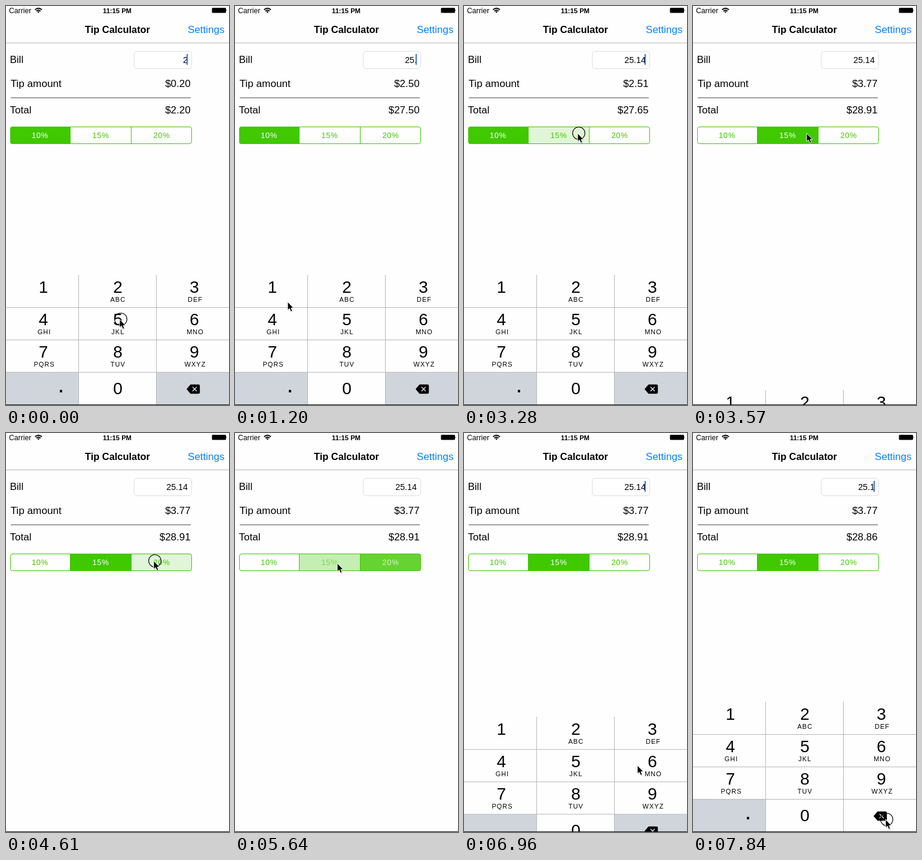
Animation of 373x665 px, one loop 7990 ms. Source, as an HTML page:

```html
<!DOCTYPE html>
<html lang="en">
<head>
<meta charset="utf-8">
<title>Tip Calculator</title>
<style>
  html, body { margin: 0; width: 100%; height: 100%; overflow: hidden; background: #fefefe; }
  svg { display: block; width: 373px; height: 665px; font: 17px "Liberation Sans", Arial, sans-serif; }
  .mid { text-anchor: middle; }
  .end { text-anchor: end; }
  .bold { font-weight: bold; }
  .digit { font-size: 28px; }
  .letters { font-size: 11px; letter-spacing: 1px; }
  .rate { font-size: 13px; letter-spacing: .7px; }
  .rule { fill: none; stroke: #b9b9bb; }
</style>
</head>
<body>
<svg viewBox="0 0 373 665">
  <rect width="373" height="665" fill="#fefefe"/>
  <path class="rule" d="M0 61.5H373"/>

  <text x="5" y="11.5" font-size="12.2">Carrier</text>
  <g fill="none" stroke="#000" stroke-width="1.8">
    <path d="M48.6 6.3Q54.3 1.3 60 6.3M50.8 8.6Q54.3 5.5 57.8 8.6"/>
    <path d="M52.4 9.6Q54.3 8 56.2 9.6L54.3 11.7Z" fill="#000" stroke="none"/>
  </g>
  <text class="mid bold" x="186" y="11.5" font-size="11.2">11:15 PM</text>
  <rect x="344.5" y="3" width="23.5" height="8.5" rx="1.5"/>
  <path d="M368.7 5.5q1.6 1.7 0 3.5z"/>

  <text class="mid bold" x="186.5" y="45" font-size="16.4">Tip Calculator</text>
  <text class="end" x="365.5" y="45" fill="#0080ff">Settings</text>

  <text x="6.5" y="95">Bill</text>
  <text x="7.5" y="135" font-size="17.2">Tip amount</text>
  <text x="6.5" y="179">Total</text>
  <rect x="214.5" y="75.5" width="96" height="29" rx="4.5" fill="#fff" stroke="#dedede"/>
  <text id="bill" class="end" x="304" y="95" font-size="14.3"></text>
  <rect id="caret" x="302" y="80" width="2" height="18" fill="#3b6fe6"/>
  <text id="tip" class="end" x="308.7" y="135"></text>
  <path d="M8 153H309" stroke="#808080" stroke-width="1.3"/>
  <text id="total" class="end" x="308.7" y="179"></text>

  <clipPath id="round"><rect x="7" y="201" width="304" height="29" rx="4"/></clipPath>
  <g id="segments" clip-path="url(#round)"></g>
  <path d="M107.5 201V230M209.5 201V230" stroke="#40c800"/>
  <rect x="7.5" y="201.5" width="303" height="28" rx="3.5" fill="none" stroke="#40c800"/>

  <g id="keyboard">
    <rect y="448" width="373" height="217" fill="#fefefe"/>
    <rect id="dotKey" y="611" width="121" height="54"/>
    <rect id="deleteKey" x="252" y="611" width="121" height="54"/>
    <path class="rule" d="M0 502.5H373M0 556.5H373M0 610.5H373M121.5 448V665M251.5 448V665"/>
    <g id="keys"></g>
    <text class="mid bold" x="92" y="644" font-size="27">.</text>
    <path d="M303 638.5L309 631.5H322Q323.5 631.5 323.5 633V644Q323.5 645.5 322 645.5H309Z"
          stroke="#000" stroke-width="1.5" stroke-linejoin="round"/>
    <path d="M312 635l7 7m0-7l-7 7" stroke="#e8ebef" stroke-width="1.4"/>
  </g>
  <rect y="664" width="373" height="1" fill="#1c1f22"/>

  <g id="pointer">
    <circle id="touch" cx="2" cy="0" r="10.3" fill="none" stroke="#000" stroke-width="1.1"/>
    <path d="M1 2V15.5L4.2 12.6L6.4 17.5L9.2 16.3L7 11.6H11Z" fill="#000" opacity=".2"/>
    <path d="M0 0V14L3.2 11.2L5.4 16.4L8 15.2L5.9 10.4H10Z" fill="#000" stroke="#fff" stroke-width="1"/>
  </g>
</svg>
<script>
const LOOP = 7990, TICK = 147.9, LAST = 53;
const KEYBOARD_HEIGHT = 217, HIDE = 23, SHOW = 46;
const GREEN = [64, 200, 0];
const $ = id => document.getElementById(id);

// Pointer waypoints: tick, x, y
const path = [
  [0, 190, 522], [1, 190, 522], [4, 104, 627], [6, 104, 627], [7, 101, 595],
  [8, 88, 493], [9, 84, 470], [10, 84, 470], [12, 80, 529], [13, 80, 529],
  [15, 278, 293], [16, 278, 293], [20, 190, 212], [24, 190, 212], [28, 247, 213],
  [33, 247, 213], [36, 171, 217], [39, 171, 217], [42, 281, 55], [43, 283, 84],
  [45, 283, 84], [47, 290, 554], [49, 317, 636], [52, 322, 644], [53, 322, 644]
];
const presses = [0, 6, 9, 12, 22, 31, 37, 44, 53];
const bills = [[0, "2"], [1, "25"], [7, "25."], [10, "25.1"], [13, "25.14"], [53, "25.1"]];
// Segment taps: tick, from, to
const taps = [[22, 0, 1], [31, 1, 2], [37, 2, 1]];
const rates = [10, 15, 20];
const edges = [7, 108, 209.5, 311];

function add(parent, tag, attrs, text = "") {
  const node = document.createElementNS("http://www.w3.org/2000/svg", tag);
  for (const name in attrs) node.setAttribute(name, attrs[name]);
  node.textContent = text;
  return parent.appendChild(node);
}

["", "ABC", "DEF", "GHI", "JKL", "MNO", "PQRS", "TUV", "WXYZ"].forEach((letters, i) => {
  const col = i % 3, y = 478 + 54 * Math.floor(i / 3);
  add($("keys"), "text", { class: "mid digit", x: [62.5, 187, 315][col], y }, i + 1);
  add($("keys"), "text", { class: "mid letters", x: [64, 187.3, 316.5][col], y: y + 15 }, letters);
});
add($("keys"), "text", { class: "mid digit", x: 187, y: 647 }, 0);

const segments = rates.map((rate, i) => ({
  fill: add($("segments"), "rect", {
    x: edges[i], y: 201, width: edges[i + 1] - edges[i], height: 29, fill: "#40c800"
  }),
  label: add($("segments"), "text", { class: "mid rate", x: [57, 158.5, 260.5][i], y: 220 }, rate + "%")
}));

function pointerAt(tick) {
  const i = Math.max(1, path.findIndex(p => p[0] >= tick));
  const [t0, x0, y0] = path[i - 1], [t1, x1, y1] = path[i];
  const f = (tick - t0) / (t1 - t0);
  return [x0 + (x1 - x0) * f, y0 + (y1 - y0) * f];
}

function segmentLevels(tick) {
  const levels = [0, 0, 0];
  const tap = taps.filter(t => t[0] <= tick).pop();
  if (!tap) return [1, 0, 0];
  const [start, from, to] = tap, age = tick - start;
  levels[from] = [1, .8][age] || 0;
  levels[to] = [.15, .3][age] || 1;
  return levels;
}

// Remaining distance of a critically damped spring
function spring(ticks) {
  const w = (ticks * .148 + .053) * 18.5;
  return (1 + w) * Math.exp(-w);
}

function keyboardOffset(tick) {
  if (tick < HIDE) return 0;
  const hidden = tick < SHOW ? 1 - spring(tick - HIDE) : spring(tick - SHOW);
  return KEYBOARD_HEIGHT * hidden;
}

function render(tick) {
  const bill = bills.filter(b => b[0] <= tick).pop()[1];
  const release = taps.filter(t => t[0] < tick).pop();
  const tip = parseFloat(bill) * rates[release ? release[2] : 0] / 100;
  $("bill").textContent = bill;
  $("tip").textContent = "$" + (tip + 1e-6).toFixed(2);
  $("total").textContent = "$" + (parseFloat(bill) + tip - 1e-6).toFixed(2);

  const blink = tick === 17 || tick === 18;
  const editing = tick < HIDE || tick >= SHOW;
  $("caret").setAttribute("opacity", editing && !blink ? 1 : 0);

  segmentLevels(tick).forEach((level, i) => {
    const mix = level < .2 ? 0 : level;
    const color = GREEN.map(c => Math.round(c + (255 - c) * mix));
    segments[i].fill.setAttribute("opacity", level);
    segments[i].label.setAttribute("fill", `rgb(${color})`);
  });

  $("keyboard").setAttribute("transform", `translate(0 ${keyboardOffset(tick).toFixed(1)})`);
  $("dotKey").setAttribute("fill", tick === 6 ? "#fefefe" : "#d0d5dc");
  $("deleteKey").setAttribute("fill", tick === LAST ? "#fefefe" : "#d0d5dc");

  $("pointer").setAttribute("transform", `translate(${pointerAt(tick)})`);
  $("touch").setAttribute("opacity", presses.includes(tick) ? 1 : 0);
}

const begin = performance.now();
function frame() {
  const time = (performance.now() - begin) % LOOP;
  render(Math.min(LAST, Math.floor(time / TICK)));
  requestAnimationFrame(frame);
}
frame();
</script>
</body>
</html>
```
